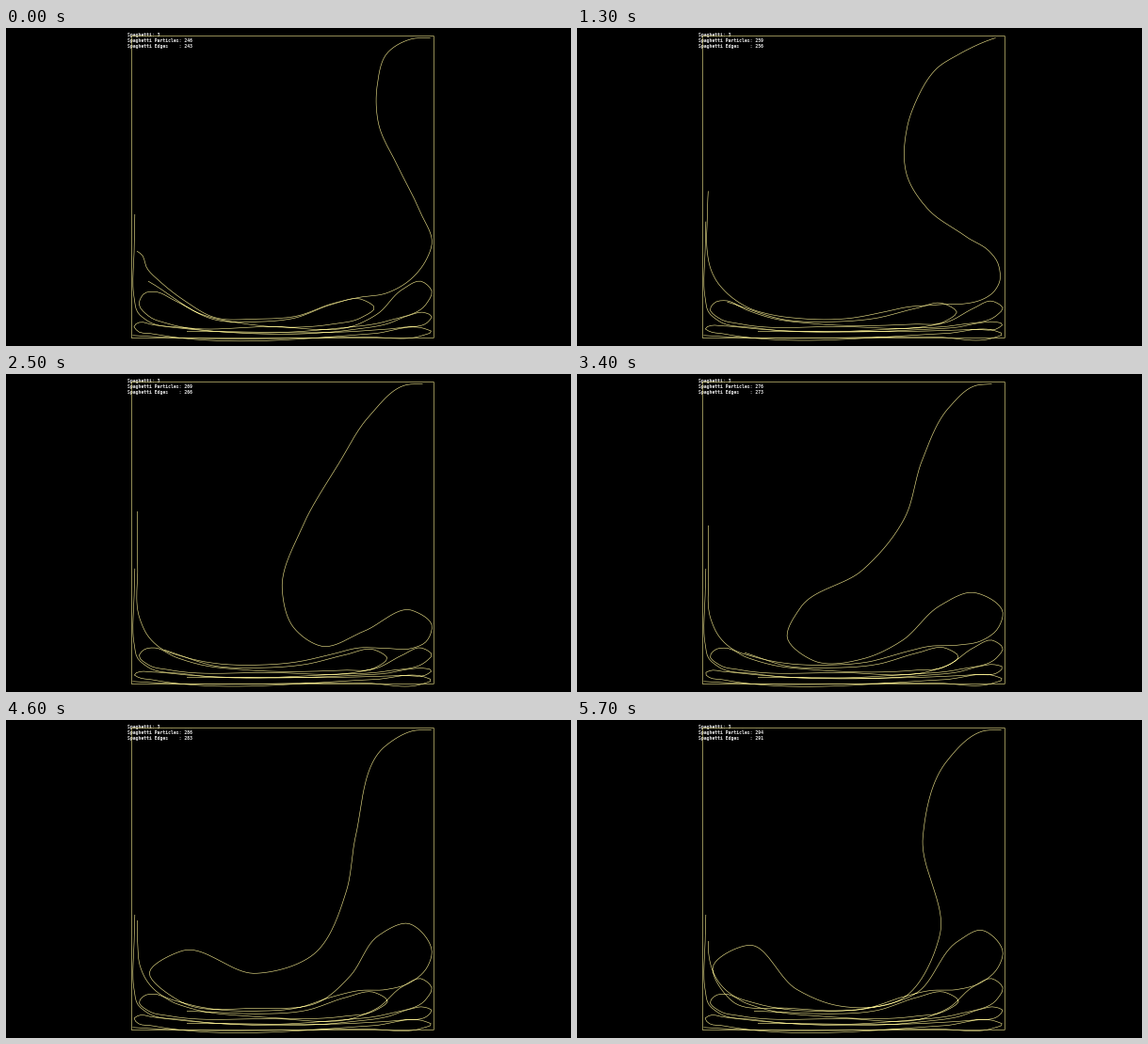
Recreate the animation shown at these times as a matplotlib script. Size 600 by 338 pixels, loop 5800 ms.

```python
import numpy as np
import matplotlib.pyplot as plt
from matplotlib.animation import FuncAnimation

W, H, DPI = 600, 338, 100
FRAMES, INTERVAL = 58, 100
PX = 72 / DPI
PASTA = "khaki"
STEP = 4


def hermite(knots, values, x):
    """Smooth cubic through values at uneven knots."""
    knots, values = np.asarray(knots, float), np.asarray(values, float)
    slope = np.gradient(values, knots, axis=0)
    i = np.clip(np.searchsorted(knots, x, side="right") - 1, 0, len(knots) - 2)
    h = knots[i + 1] - knots[i]
    u = (x - knots[i]) / h
    if values.ndim > 1 and np.ndim(x):
        u, h = u[:, None], h[:, None]
    return ((1 + 2 * u) * (1 - u) ** 2 * values[i]
            + u * (1 - u) ** 2 * h * slope[i]
            + u * u * (3 - 2 * u) * values[i + 1]
            + u * u * (u - 1) * h * slope[i + 1])


def smooth(points):
    """Spline through points, resampled evenly along its length."""
    p = np.array(points, float)
    s = np.r_[0, np.cumsum(np.hypot(*np.diff(p, axis=0).T))]
    fine = hermite(s, p, np.linspace(0, s[-1], int(s[-1] / 1.5)))
    arc = np.r_[0, np.cumsum(np.hypot(*np.diff(fine, axis=0).T))]
    at = np.linspace(0, arc[-1], int(arc[-1] / STEP) + 1)
    return np.c_[np.interp(at, arc, fine[:, 0]), np.interp(at, arc, fine[:, 1])]


def fed(t):
    """Particles fed so far; the fraction is the progress of the next one."""
    return 246.15 + 48 * (t / 5.7) ** 0.86


def feed(t):
    return 452 - 13 * (fed(t) % 1), 10.3


def settle(t):
    return 1 - np.exp(-1.5 * t)


class Pose:
    """Strand at one moment: a free part, then a bed shared by all poses."""

    def __init__(self, t, squash, bend, tail, end, free):
        self.t, self.squash, self.end = t, squash, end
        drop, top, lay = bend - 230, 286 + 5 * squash, 269 + 22 * settle(t)
        bed = [(452, bend), (446, bend + 17), (430, 267 + 0.66 * drop),
               (403, 282 + 0.25 * drop), (375, top), (345, top + 7),
               (310, 305.5), (265, 309), (220, 307), (190, 155.5 + lay / 2),
               (163, lay), (150, lay - 13), (142, lay - 30),
               (139.5, (lay - 30 + tail) / 2), (139, tail)]
        self.path = smooth([feed(t), *free, *bed])[::-1]


POSES = [
    Pose(0, 0, 229, 237, (151, 269),
         [(432, 11), (404, 27), (394, 60), (395, 100), (417, 149), (440, 196)]),
    Pose(0.8, 0.7, 258, 195, (156, 288),
         [(420, 13), (383, 50), (367, 102), (379, 152), (408, 192), (438, 222)]),
    Pose(1.8, 1, 268, 157, (163, 291),
         [(427, 11), (396, 29), (361, 73), (338, 124), (331, 158), (341, 207),
          (370, 229), (420, 242), (445, 253)]),
    Pose(2.5, 0.95, 267, 146, (168, 293),
         [(426, 11), (385, 45), (353, 95), (314, 163), (293, 228), (305, 269),
          (335, 289), (380, 273), (431, 251)]),
    Pose(3.4, 0.6, 254, 161, (178, 296),
         [(423, 12), (395, 35), (366, 92), (348, 152), (303, 208), (237, 248),
          (223, 280), (250, 304), (305, 302), (345, 283), (385, 246), (421, 232)]),
    Pose(4.6, 0.25, 247, 213, (192, 309),
         [(433, 11), (403, 27), (371, 123), (361, 182), (326, 249), (265, 269),
          (187, 245), (152, 268), (185, 299), (265, 306), (335, 298), (365, 272),
          (395, 229), (427, 216)]),
    Pose(5.7, 0.25, 247, 235, (188, 309),
         [(433, 11), (392, 44), (367, 124), (385, 228), (345, 296), (275, 303),
          (233, 286), (183, 239), (144, 262), (165, 299), (225, 306), (310, 306),
          (360, 290), (404, 235), (429, 223)]),
]
TIMES = np.array([p.t for p in POSES])
SIZES = np.array([len(p.path) for p in POSES])


def extend(path):
    """Continue a path beyond the feed as a straight queue."""
    k = np.arange(1, SIZES.max() - len(path) + 1)
    return np.vstack([path, path[-1] + np.c_[k * STEP, 0 * k]])


PATHS = np.array([extend(p.path) for p in POSES])


def falling(t):
    size = int(round(np.interp(fed(t), fed(TIMES), SIZES)))
    p = hermite(TIMES, PATHS, t)[:size]
    gap = np.arange(size)[::-1] * STEP
    p = p + (feed(t) - p[-1]) * np.exp(-gap / 50)[:, None]
    return np.clip(p, (135.5, 10), (452.5, 328.5))


def middle(t, squash, end):
    s, h = settle(t), 23 * squash
    x, y = 391 + 14 * s, 288 + 5 * squash    # inner loop, right tip
    top = 280 + 11 * s                       # inner loop, left top
    side = 139 + 0.55 * top
    return smooth([
        end, (225, 310.5), (265, 312), (x - 85, 308), (x - 45, y + 5.5),
        (x - 14, y), (x, y + 9), (x - 15, y + 20), (x - 45, 314.5), (255, 314.3),
        (205, top / 2 + 163), (180, top + 10), (157, top), (147, top + 1.5),
        (141, side), (152, side / 2 + 160), (172, 314), (280, 317),
        (375, 314 + 0.1 * h), (395, 303 + 0.4 * h), (420, 278 + 0.95 * h),
        (441, 269 + h), (452, 280 + 0.85 * h), (446, 293 + 0.55 * h),
        (405, 311 + 0.2 * h), (350, 319), (190, 318.5), (150, 311),
        (139, 301), (136, 288), (135.8, 235), (136.5, 198 + 9 * s)])


def bottom(squash):
    h, low = 11 * squash, 319.5 + 2.7 * squash
    d = 0.35 * h
    return smooth([
        (192, 322), (380, 321.5), (420, 318 + 0.2 * h), (448, 312 + 0.6 * h),
        (452, 306.5 + 0.8 * h), (443, 302 + h), (428, 305 + 0.8 * h),
        (405, 314 + 0.35 * h), (370, 320), (200, 320.3), (155, 315 + 0.4 * d),
        (141, 312.7 + d), (135.5, 316.5 + 0.7 * d), (139, 321.5), (155, 324.7),
        (390, 324.5), (445, low), (452, low + 3), (442, low + 7), (380, 328),
        (160, 328), (134.5, 326.5)])


fig = plt.figure(figsize=(W / DPI, H / DPI), dpi=DPI, facecolor="black")
ax = fig.add_axes((0, 0, 1, 1))
ax.set(xlim=(0, W), ylim=(H, 0))
ax.axis("off")

label_style = dict(family="DejaVu Sans Mono", weight="bold", size=4.75 * PX,
                   color="0.9", va="baseline")
ax.text(129, 9, "Spaghetti: 3", **label_style)
particles = ax.text(129, 15, "", **label_style)
edges = ax.text(129, 20.9, "", **label_style)

ax.add_patch(plt.Rectangle((133.3, 8.5), 321, 320.9, fill=False, ec=PASTA,
                           lw=0.6 * PX, snap=False, zorder=4))
strands = [ax.plot([], [], color=PASTA, lw=0.6 * PX, snap=False, zorder=3,
                   solid_joinstyle="round")[0] for _ in range(3)]


def draw(frame):
    t = frame * INTERVAL / 1000
    squash = hermite(TIMES, [p.squash for p in POSES], t)
    end = hermite(TIMES, [p.end for p in POSES], t)
    shapes = falling(t), middle(t, squash, end), bottom(squash)
    for line, shape in zip(strands, shapes):
        line.set_data(shape[:, 0] + 0.3, shape[:, 1] + 0.3)
    count = int(fed(t))
    particles.set_text(f"Spaghetti Particles: {count}")
    edges.set_text(f"Spaghetti Edges    : {count - 3}")
    return [*strands, particles, edges]


anim = FuncAnimation(fig, draw, frames=FRAMES, interval=INTERVAL,
                     repeat=True, repeat_delay=0, blit=False)
plt.show()
```
